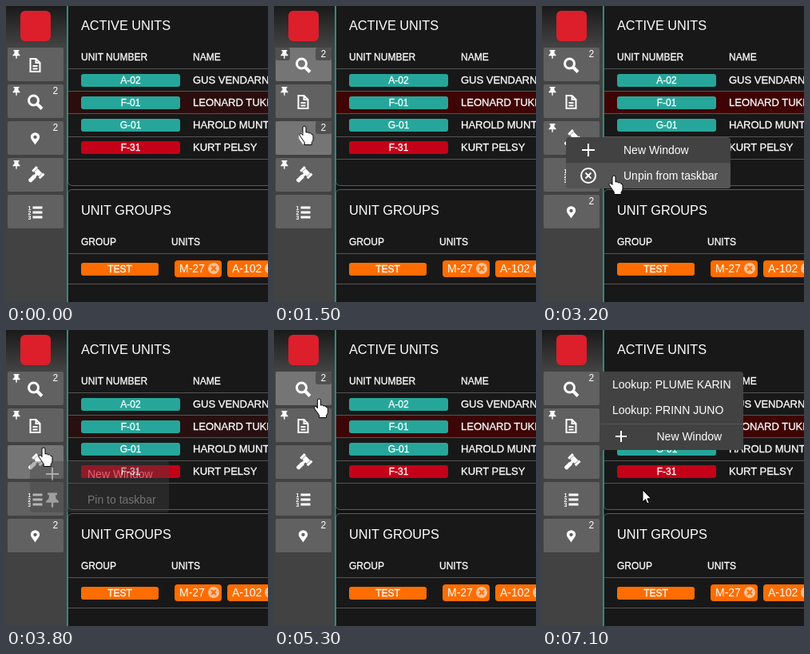
These frames come from a looping animation (328 px wide and 370 px high, 7.2 s). An HTML page:

```html
<!DOCTYPE html>
<html lang="en">
<head>
<meta charset="utf-8">
<title>Taskbar</title>
<style>
  html, body { margin: 0; width: 100%; height: 100%; overflow: hidden; background: #121212; }
  svg { display: block; font: 14px "Liberation Sans", Arial, sans-serif; fill: #fff; }
  .title { font-size: 16.3px; }
  .head, .pill, .badge { font-size: 12px; }
  .name { font-size: 13px; }
  .head, .pill, .name { stroke: #fff; stroke-width: .3; }
  .pill { text-anchor: middle; }
  .line { stroke: #555; }
  .panel { fill: #181818; stroke: #3f6b67; }
  .face { fill: #616161; }
  .chip { fill: #505050; display: none; }
  .hover .face { fill: #757575; }
  .hover .chip { display: inline; }
  .stroke { fill: none; stroke: #fff; stroke-width: 2; }
  .sheet { fill: #424242; }
  .row { fill: #545454; }
  .cursor { stroke: #000; stroke-linejoin: round; }
</style>
</head>
<body>
<svg width="328" height="370" viewBox="0 0 328 370">
  <defs>
    <linearGradient id="shade" x2="0" y2="1">
      <stop stop-color="#1a1a1a"/><stop offset="1" stop-color="#424242"/>
    </linearGradient>
  </defs>
  <g id="board"></g>
  <rect width="76" height="370" fill="#424242"/>
  <rect width="76" height="50" fill="url(#shade)"/>
  <rect x="76" width="1.5" height="370" fill="#2b9488"/>
  <rect x="18" y="6" width="38" height="38" rx="6" fill="#dc1f2b"/>
  <g id="bar"></g>
  <g id="context">
    <rect class="sheet" id="contextSheet" height="64" rx="4"/>
    <rect class="row" id="contextRow" y="32" height="32" rx="3"/>
    <path class="stroke" d="M20 16h16M28 8v16"/>
    <g id="unpinIcon" class="stroke"><circle cx="28" cy="48" r="9"/><path d="M24.5 44.5l7 7m0-7l-7 7"/></g>
    <g id="pinIcon" transform="translate(28 48) scale(1.7)"></g>
    <text x="72" y="21">New Window</text>
    <text x="72" y="53" id="contextLabel"></text>
  </g>
  <g id="lookup" transform="translate(72 52)">
    <rect class="sheet" width="180" height="98" rx="4"/>
    <rect class="row" id="lookupRow" width="180" height="32"/>
    <path d="M0 65.5h180" stroke="#555"/>
    <path class="stroke" d="M20 81h14M27 74v14"/>
    <text x="16" y="21">Lookup: PLUME KARIN</text>
    <text x="16" y="53">Lookup: PRINN JUNO</text>
    <text x="71.5" y="86">New Window</text>
  </g>
  <path id="hand" class="cursor" d="M-2 2a2 2 0 0 1 4 0v6q2.5-1 3.3 .8q2.5-.6 3.3 1.2q2.4 0 2.4 2.6v4q0 2-1.8 4v2.9h-9v-3l-5.2-7.5q-2-2.8 .2-3.5q2-.3 2.8 2z"/>
  <path id="arrow" class="cursor" d="M0 0v15l3.5-3.3 2.3 5.3 2.4-1-2.3-5.2h4.8z"/>
</svg>
<script>
const LOOP = 7200, STEP = 100;
const $ = id => document.getElementById(id);
const text = (cls, x, y, s) => `<text class="${cls}" x="${x}" y="${y}">${s}</text>`;
const rule = y => `<path class="line" d="M78 ${y}.5h250"/>`;
const pill = (y, width, fill, s) =>
  `<rect x="94" y="${y}" width="${width}" height="16" rx="3" fill="${fill}"/>` +
  text("pill", 94 + width / 2, y + 12.3, s);
const unit = (x, width, s) => `<rect x="${x}" y="318" width="${width}" height="21" rx="4" fill="#ff6d00"/>
  ${text("", x + 6, 333, s)}
  <circle cx="${x + width - 10}" cy="328" r="7" fill="#ffc299"/>
  <path d="M${x + width - 13} 325l6 6m0-6l-6 6" stroke="#ff6d00" stroke-width="2"/>`;

const TEAL = "#26a69a", RED = "#c40018", ORANGE = "#ff6d00";
const units = [
  ["A-02", "GUS VENDARN", TEAL], ["F-01", "LEONARD TUKES", TEAL],
  ["G-01", "HAROLD MUNTER", TEAL], ["F-31", "KURT PELSY", RED]
];
$("board").innerHTML = `
  <rect class="panel" x="77.5" y="-9.5" width="300" height="234" rx="5"/>
  <rect class="panel" x="77.5" y="229.5" width="300" height="200" rx="5"/>
  <rect id="alarm" x="78" y="107" width="250" height="28" fill="#400404"/>
  ${text("title", 94, 30, "ACTIVE UNITS")}${text("head", 94, 68, "UNIT NUMBER")}${text("head", 234, 68, "NAME")}
  ${rule(78)}
  ${units.map(([code, name, fill], i) => pill(85 + 28 * i, 124, fill, code) +
    text("name", 234, 97 + 28 * i, name) + rule(Math.round(106.2 + 28.2 * i))).join("")}
  ${text("title", 94, 261, "UNIT GROUPS")}${text("head", 94, 299, "GROUP")}${text("head", 207, 299, "UNITS")}
  ${rule(309)}${pill(321, 97, ORANGE, "TEST")}${unit(211, 59, "M-27")}${unit(277, 64, "A-102")}${rule(347)}`;

const thumbtack = `<path d="M-3.5-5h7v1.6h-1.2l.4 3q2 1 2 2.6h-4v3l-.7 1-.7-1v-3h-4q0-1.6 2-2.6l.4-3h-1.2z"/>`;
$("pinIcon").innerHTML = thumbtack;

// Icons are drawn around the centre of their button.
const icons = {
  doc: `<path class="stroke" d="M-6-8h7l5 5v11h-12zM1-8v5h5M-3 1h6M-3 4.500h6"/>`,
  gavel: `<g transform="translate(1 -1) rotate(45)"><path d="M-4-7h8v6h-8zM-7.500-8h3v8h-3zM4.500-8h3v8h-3zM-1.700-1h3.400v3h.8v9q-2.500 2-5 0v-9h.8z"/></g>`,
  list: `<path d="M-3-7.500h12v3h-12zM-3-1.500h12v3h-12zM-3 4.500h12v3h-12z"/>
    <g font-size="7" font-weight="bold">${[1, 2, 3].map(n => text("", -9, 6 * n - 9.5, n)).join("")}</g>`,
  marker: `<path transform="scale(.87)" fill-rule="evenodd" d="M0 8.500C-2 5-6.500 1-6.500-2.500a6.500 6.500 0 0 1 13 0C6.500 1 2 5 0 8.500zM0-5a2.500 2.500 0 1 0 .01 0z"/>`,
  search: `<circle class="stroke" style="stroke-width:3" cx="-2" cy="-2" r="6"/><path class="stroke" style="stroke-width:4" d="M2.500 2.500l6 6"/>`
};
const pinned = ["doc", "search", "gavel"], counted = ["search", "marker"];
$("bar").innerHTML = Object.entries(icons).map(([id, icon]) => `<g id="${id}">
  <rect class="face" width="70" height="42" rx="2"/>
  <g transform="translate(34.500 22)">${icon}</g>
  ${pinned.includes(id) ? `<g id="${id}Pin"><rect class="chip" width="18" height="16" rx="3"/>
    <g transform="translate(11 8)">${thumbtack}</g></g>` : ""}
  ${counted.includes(id) ? `<rect class="chip" x="50" width="20" height="16" rx="3"/>${text("badge", 56.5, 12, 2)}` : ""}
</g>`).join("");

// Tracks hold [time, ...values].
const slots = {
  doc: [[950, 0], [1100, 1]],
  search: [[850, 1], [1150, 0]],
  marker: [[1600, 2], [2200, 4]],
  gavel: [[1750, 3], [1900, 2]],
  list: [[2000, 4], [2150, 3]]
};
const pointer = [
  [100, 60, 385], [700, 37, 118], [850, 37, 118], [1150, 37, 72], [1250, 37, 74],
  [1450, 38, 150], [1600, 38, 150], [2200, 36, 246], [2300, 36, 246], [2500, 35, 208],
  [2700, 31, 164], [2900, 31, 164], [3200, 90, 212], [3450, 90, 212], [3800, 47, 147],
  [4100, 36, 78], [4250, 36, 78], [4600, 88, 126], [4850, 88, 126], [5200, 60, 90],
  [5500, 46, 75], [6000, 46, 75], [6300, 110, 100], [6600, 150, 132], [6750, 150, 132], [7050, 126, 200]
];
const contextFade = [[2800, 0], [2950, 1], [3600, 1], [3930, 0], [4250, 0], [4400, 1], [4900, 1], [5230, 0]];
const lookupFade = [[5700, 0], [6060, 1]];

function at(track, t) {
  const next = track.findIndex(key => key[0] > t);
  if (next < 1) return track.at(next).slice(1);
  const a = track[next - 1], b = track[next];
  const u = (t - a[0]) / (b[0] - a[0]), s = u * u * (3 - 2 * u);
  return a.slice(1).map((v, i) => v + (b[i + 1] - v) * (track === pointer ? s : u));
}
const set = (id, attrs) => { for (const k in attrs) $(id).setAttribute(k, attrs[k]); };
const show = (id, on) => set(id, { visibility: on ? "visible" : "hidden" });

function draw(t) {
  const [x, y] = at(pointer, t);
  const [context] = at(contextFade, t), [lookup] = at(lookupFade, t);
  set("alarm", { opacity: (1 + Math.cos((t - 1400) / 1870 * 2 * Math.PI)) / 2 });

  const settling = t >= 2200 && t < 2600;
  for (const id in slots) {
    const top = 52 + 46 * at(slots[id], t)[0];
    const under = x < 72 && y >= top && y < top + 42 && context < 0.9 && lookup < 0.9;
    const held = id === "search" && t > 850 && t < 1700 || id === "marker" && t >= 1600 && t < 2200;
    const hover = settling ? id === "gavel" : under || held;
    set(id, { transform: `translate(2 ${top})`, class: hover ? "hover" : "" });
  }
  show("gavelPin", t < 3500);
  show("searchPin", t < 4850);

  const first = t < 4100, [left, top] = first ? [30, 164] : [35, 78];
  const unpin = t < (first ? 3500 : 4850), width = unpin ? 206 : 174;
  set("context", { transform: `translate(${left} ${top})`, opacity: context });
  set("contextSheet", { width });
  set("contextRow", { width, opacity: +(x > left && y > top + 32 && y < top + 64) });
  $("contextLabel").textContent = unpin ? "Unpin from taskbar" : "Pin to taskbar";
  set("unpinIcon", { opacity: +unpin });
  set("pinIcon", { opacity: +!unpin });

  const row = Math.floor((y - 52) / 32.6);
  set("lookup", { opacity: lookup });
  set("lookupRow", { y: row * 33, opacity: +(x > 72 && row >= 0 && row < 3) });

  const plain = y > 282 || t > 6750 && y > 150;
  for (const id of ["hand", "arrow"]) set(id, { transform: `translate(${x} ${y})` });
  show("hand", !plain);
  show("arrow", plain);
}

function tick() {
  draw(Math.floor((performance.now() + 10) / STEP) * STEP % LOOP);
  requestAnimationFrame(tick);
}
tick();
</script>
</body>
</html>
```
